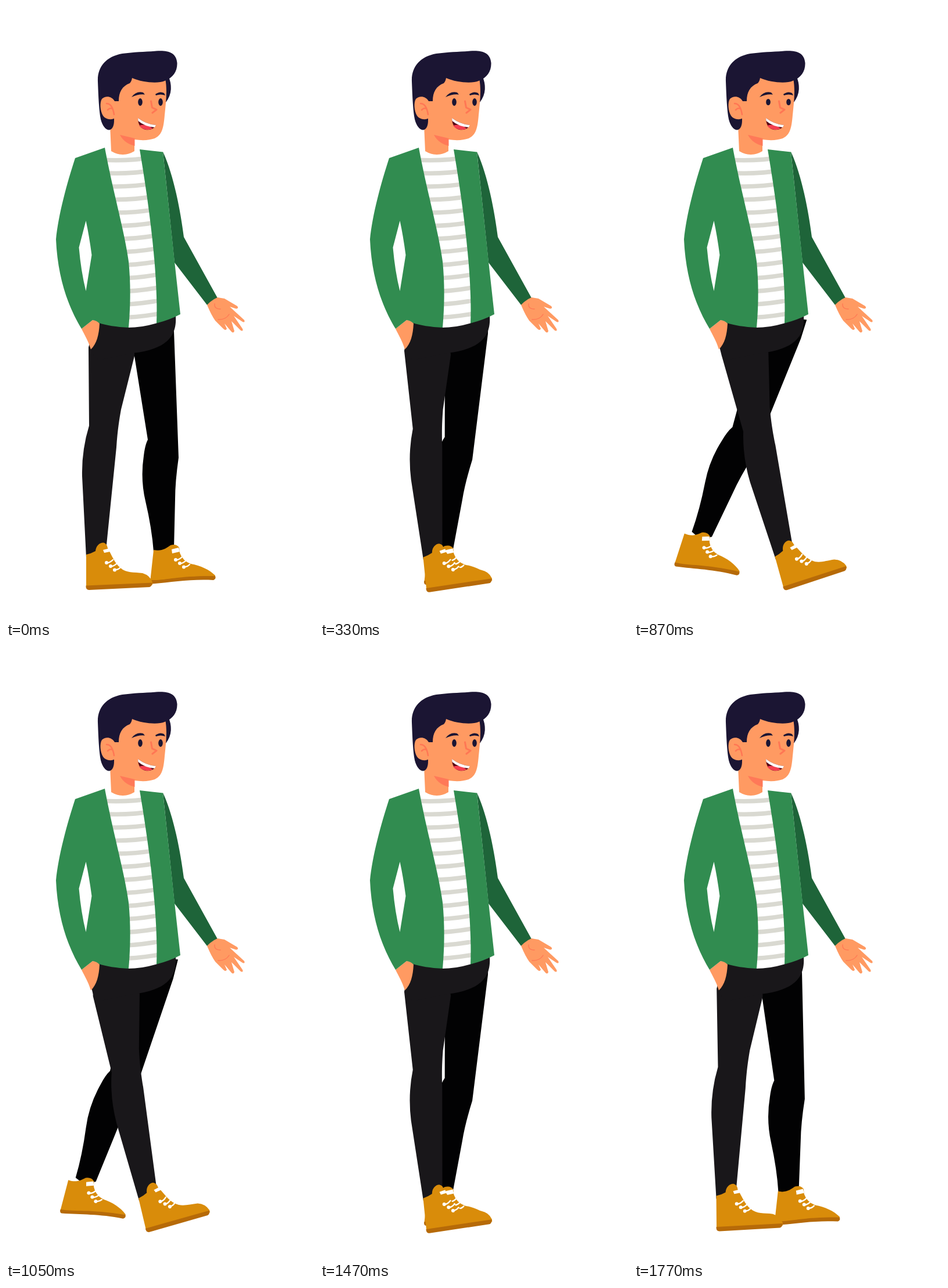
These frames come from a looping animation (530 by 1056 pixels, 1.8 s). An HTML page:

```html
<!DOCTYPE html>
<html lang="en">
<head>
<meta charset="utf-8">
<title>Walking man</title>
<style>
  html, body { margin: 0; width: 100%; height: 100%; overflow: hidden; background: #fff; }
  svg { display: block; width: 100%; height: 100%; }
  .skin { fill: #ff9a62; }
  .hair { fill: #1b1533; }
  .jacket { fill: #318c50; }
  .trousers { fill: #19171a; }
  .shoe { fill: #d98c0a; }
  .sole { fill: #b66a08; }
  .white { fill: #fff; }
  .line { fill: none; stroke: #ff7754; stroke-linecap: round; stroke-linejoin: round; }
  .lace { fill: none; stroke: #fff; stroke-width: 2.4; stroke-linecap: round; }
  #stripes { fill: none; stroke: #d9d9d1; stroke-width: 7.5; }
</style>
</head>
<body>
<svg viewBox="0 0 530 1056">
  <defs>
    <g id="laces">
      <path class="lace" d="M0 0Q5 1 11 -5M7 6Q12 7 18 1M14 12Q19 13 24 8"/>
      <g class="white"><circle r="3"/><circle cx="7" cy="6" r="3"/><circle cx="14" cy="12.5" r="3"/></g>
    </g>
  </defs>

  <g id="backLeg">
    <path fill="#020203" d="M240 540L285 526L289 560L297 778Q291 820 291 850L289 934L271 945L254 940Q251 900 240 853Q231 815 237 775Q239 757 244 747L221 603L215 560Z"/>
    <g id="backFoot">
      <path class="shoe" d="M254 937C268 940 276 934 283 929Q293 926 298 933L299 942Q304 956 318 961C335 964 350 971 360 981V986L248 992Z"/>
      <path class="sole" d="M248 989C275 990 295 981 360 982Q362 987 357 989C315 987 285 993 251 995.5Q247 995 248 989Z"/>
      <path class="white" d="M285 936L297 933L299 940L286 943Z"/>
      <use href="#laces" x="292" y="954"/>
    </g>
  </g>

  <g id="frontLeg">
    <path class="trousers" d="M142 588L143 723Q130 765 131 810L138 950L172 940L173 928L190 760C192 730 195 712 198 695L221 603V560H150Z"/>
    <path class="shoe" d="M138 945Q147 943 154 939C155 929 162 924 168 924.500Q174 926 175 934C182 946 187 960 197 968C207 977 220 975 235 977Q248 981 252 993V997L138 1002Z"/>
    <path class="sole" d="M137.500 998.500L251.500 993.500Q252 999 247 1001L143 1006Q137 1006 137.500 998.500Z"/>
    <path class="white" d="M167 937L177 934.500L179 940L169 942Z"/>
    <use href="#laces" x="173" y="959"/>
  </g>

  <path class="trousers" d="M158 540L292 534C294 562 282 576 266 585C252 592 236 596 221 597.500L160 610L151 603L147 587Z"/>

  <path fill="#1e6439" d="M270 251C288 290 300 350 306 398L364 503L346 515L290 442Z"/>
  <path class="skin" d="M346 515Q354 506 364 502L376 504L398 517Q401 521 396 521.500L385 518L410 541Q412 546 407 544L392 534L407 556Q409 561 404 559L388 543L393 560Q391 565 387 560L376 547L380 556Q378 560 374 556L360 542Q353 532 346 515Z"/>
  <path class="line" stroke-width="1.3" d="M359 513Q358 522 369 522M365 540Q378 541 384 531"/>

  <path class="white" d="M170 243L181 239H221L230 247C250 360 262 470 260 546Q235 554 210 554C216 460 200 380 170 243Z"/>
  <g id="stripes"></g>
  <path class="jacket" d="M230 247L270 251.500L290 440L300 531Q281 541 259 546.500C262 470 249 360 230 247Z"/>
  <path class="skin" d="M130 556L149 541Q158 541 161 547C160 567 156 582 146 591.500C141 575 135 567 130 556Z"/>
  <path class="jacket" fill-rule="evenodd" d="M119 262L170 244C184 320 204 388 211 440C215 480 214 520 211 554C190 553 172 550 160 546Q156 542 149 541L130 556C108 520 89 470 86 402C90 360 105 305 119 262ZM137.500 370L125.500 416Q129 457 137.500 491L147.500 429Q143 395 137.500 370Z"/>

  <path class="hair" d="M279 120C286 135 286 152 275 166L268 130Z"/>
  <path class="skin" d="M185 160L217 122L274 125C278 145 275 168 273 188C271 212 268 222 256 228Q242 233 221 230V250Q201 262 181 250L179 205Z"/>
  <path fill="#ff7958" d="M196 222L221.500 228V241Q204 237 196 222Z"/>
  <path class="hair" d="M194 164C194 148 200 138 213 133Q216 130 217 124C235 132 262 134 273 129C288 123 295 112 294.500 98C293 79 277 76 258 77.500C240 79 220 79 200 82C172 87 157 105 158 130C159 156 160 180 163 195C166 207 172 214 178 213.500C184 212 186 205 186 197V164Z"/>
  <path class="skin" d="M194 164H187C182 155 171 154 165 160C161 166 162 181 167 189C172 196 182 197 190 192Z"/>
  <path class="line" stroke-width="2.500" d="M173 168Q183 168 186 187M175 179Q179 175 183 177"/>

  <path class="hair" d="M216 157Q224 146 236 149L239 152.500Q228 151 216 157ZM257 152Q265 146 272 150L274 154Q266 151 258 154Z"/>
  <g class="hair">
    <ellipse class="eye" cx="231" cy="165.500" rx="3.800" ry="6.500"/>
    <ellipse class="eye" cx="266" cy="165.500" rx="3.800" ry="6.500"/>
  </g>
  <path class="line" stroke-width="3" d="M249.500 164L251.500 175L259 178.500L252 184"/>
  <path fill="#5b0914" d="M227 193Q242 204 258 205C255 212 248 214 240 213C231 211 227 203 227 193Z"/>
  <path fill="#f43f50" d="M229 206Q242 202 252 211C245 215 234 213 229 206Z"/>
  <path class="white" d="M227 193Q242 204 258 205L256 209Q239 208 227.500 198Z"/>
</svg>
<script>
  const LOOP = 1800, HALF = LOOP / 2, STEP = 30;
  const byId = id => document.getElementById(id);
  const rotate = (id, angle, x, y) => byId(id).setAttribute('transform', `rotate(${angle} ${x} ${y})`);
  const eyes = document.querySelectorAll('.eye');

  let stripes = '';
  for (let i = 0; i < 13; i++) {
    stripes += `<path d="M165 ${265 + i * 22.6}c35 2 65 0 97 -6"/>`;
  }
  byId('stripes').innerHTML = stripes;

  function draw(now) {
    const time = Math.floor(now % LOOP / STEP) * STEP;
    const swing = 1 - Math.abs(1 - time / HALF);   // 0 → 1 → 0
    rotate('backLeg', 25 * swing, 257, 562);
    rotate('backFoot', -12.4 * Math.min(1, swing * 2), 300, 990);
    rotate('frontLeg', -16 * swing, 203, 562);

    // short blink at the far end of the step
    const open = Math.min(1, 0.1 + 0.9 * Math.abs(time - HALF) / 36);
    eyes.forEach(eye => eye.setAttribute('ry', 6.5 * open));
  }

  const start = performance.now();
  (function frame() {
    draw(performance.now() - start);
    requestAnimationFrame(frame);
  })();
</script>
</body>
</html>
```
